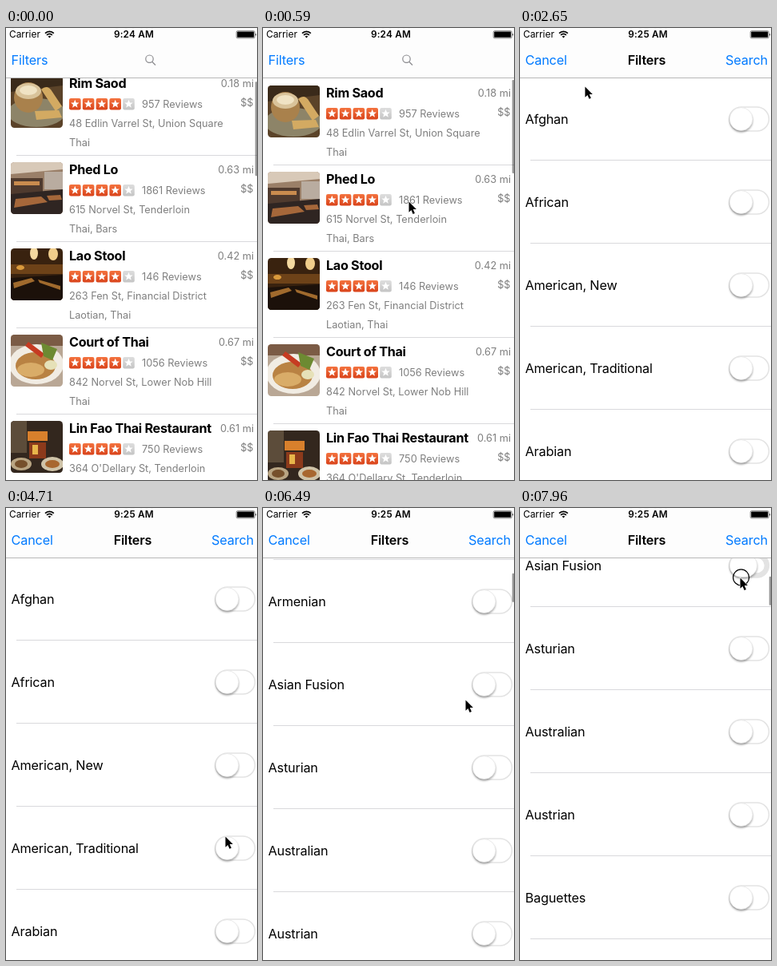
Recreate the animation shown at these times as an HTML page. Size 314x566 px, loop 8000 ms.

```html
<!DOCTYPE html>
<html lang="en">
<head>
<meta charset="utf-8">
<title>Restaurant filters</title>
<style>
  html, body { margin: 0; width: 100%; height: 100%; overflow: hidden; background: #fff; }
  svg { display: block; width: 314px; height: 566px; font: 16.2px Inter, Roboto, sans-serif; letter-spacing: -.14px; }
  .name { font-weight: 700; letter-spacing: -.3px; }
  .info { font-size: 12.75px; letter-spacing: 0; fill: #7f7f7f; }
  .title { font-weight: 600; text-anchor: middle; }
  .link { fill: #007aff; }
  .end { text-anchor: end; }
  .line { stroke: #d9d9dc; }
  .bar { fill: #000; opacity: .4; }
  .knob { fill: #fff; stroke: #ddd; stroke-width: .6; filter: drop-shadow(0 2px 1.3px rgba(0,0,0,.32)); }
  .track { fill: #fff; stroke: #e3e3e3; stroke-width: 1.5; }
  .on .track { x: 264.3px; y: 39.5px; width: 44.6px; height: 25px; rx: 12.5px; stroke-width: 6.5; }
</style>
</head>
<body>
<svg viewBox="0 0 314 566">
  <defs>
    <clipPath id="round"><rect width="65" height="65" rx="4.5"/></clipPath>
    <linearGradient id="orange" x2="0" y2="1"><stop stop-color="#f4733f"/><stop offset="1" stop-color="#d9431a"/></linearGradient>
    <linearGradient id="gray" x2="0" y2="1"><stop stop-color="#dedede"/><stop offset="1" stop-color="#c4c4c4"/></linearGradient>
    <path id="star" fill="#fff" d="M0-5.4 1.5-1.8 5.2-1.6 2.3.8 3.3 4.5 0 2.4-3.3 4.5-2.3.8-5.2-1.6-1.5-1.8Z"/>
  </defs>

  <g id="places"></g>
  <rect id="placesBar" class="bar" x="311.7" width="2.6" rx="1.2"/>
  <rect width="314" height="62" fill="#fdfdfd"/>
  <path d="M0 62.5H314" stroke="#b8b8b8"/>
  <text id="open" class="link" x="6.5" y="46">Filters</text>
  <path d="M183 42.5 187 46.5M184.2 38.7a4.7 4.7 0 1 1-9.4 0a4.7 4.7 0 1 1 9.4 0" fill="none" stroke="#8a8a8e" stroke-width="1.2"/>

  <g id="modal">
    <rect width="314" height="566" fill="#fff"/>
    <g id="filters"></g>
    <rect id="filtersBar" class="bar" x="311.7" width="2.6" height="36" rx="1.2"/>
    <rect width="314" height="62" fill="#fdfdfd"/>
    <path d="M0 62.5H314" stroke="#b8b8b8"/>
    <text class="link" x="6.5" y="46">Cancel</text>
    <text class="title" x="158.5" y="46">Filters</text>
    <text class="link end" x="310" y="46">Search</text>
  </g>

  <g style="letter-spacing:0">
    <text x="4" y="12.3" font-size="11.9">Carrier</text>
    <g fill="none" stroke="#000" stroke-width="1.7">
      <path d="M49 6.6a7.6 7.6 0 0 1 10.8 0M51 8.8a4.8 4.8 0 0 1 6.8 0"/>
      <path d="M54.4 12.4 52.6 10.5a2.6 2.6 0 0 1 3.6 0Z" fill="#000" stroke="none"/>
    </g>
    <text id="clock" class="title" x="160" y="12.4" font-size="11.8" style="letter-spacing:.2px"></text>
    <rect x="288.2" y="3.6" width="23" height="9.2" rx="1.6" fill="#fff" stroke="#666" stroke-width=".8"/>
    <rect x="289.2" y="4.6" width="21" height="7.2" rx=".6"/>
    <path d="M312.1 6.5q1.8 1.7 0 3.4Z"/>
  </g>

  <g id="cursor">
    <circle id="press" cx="1.6" cy="-.1" r="10" fill="none" stroke="#000" stroke-width="1.2"/>
    <path d="M.5.6V13.8L3.5 11 5.6 15.9 7.9 14.9 5.8 10.1H9.9Z" stroke="#fff" stroke-width="1.2" paint-order="stroke"/>
  </g>
</svg>
<script>
const $ = id => document.getElementById(id);
const shape = (fill, d) => `<path fill="${fill}" d="${d}"/>`;
const disc = (fill, x, y, rx, ry = rx) => `<ellipse fill="${fill}" cx="${x}" cy="${y}" rx="${rx}" ry="${ry}"/>`;
const ground = fill => shape(fill, 'M0 0H65V65H0Z');

const photos = [
  ground('#5b4329') + shape('#3a2a1a', 'M0 0H65V12L0 20Z') + disc('#8d8468', 32, 46, 36, 18) +
    disc('#a9814c', 22, 27, 18, 19) + disc('#d9c39a', 22, 19, 16, 10) + disc('#f0e3c4', 22, 18, 11, 6) +
    shape('#d3aa62', 'M38 17Q46 10 52 20L64 38 56 44ZM30 44 60 43 64 52 32 55Z'),
  ground('#9a7f68') + shape('#d8c9b8', 'M0 0H65V9L0 15Z') + shape('#4f3a2e', 'M0 20H40V40H0Z') +
    shape('#c98b4e', 'M4 24H36V29H4Z') + shape('#b9aca0', 'M42 12H65V34H42Z') +
    shape('#2f2522', 'M0 40 65 34V65H0Z') + shape('#a5673a', 'M6 46 38 43 46 50 4 57ZM45 42 62 41 64 47 48 48Z'),
  ground('#39220f') + shape('#6d4218', 'M0 20H65V32H0Z') + disc('#f4d9a0', 29, 6, 5, 8) + disc('#f0cd8b', 53, 7, 6, 8) +
    disc('#d99a3c', 12, 24, 5, 3) + shape('#1c110a', 'M0 37 65 33V65H0Z') +
    shape('#a06a2d', 'M3 43 26 37 30 41 4 50ZM34 39 62 47V52L36 43Z'),
  ground('#b9a795') + shape('#7b5b45', 'M0 0H65V14H0Z') + disc('#f1ece3', 32, 37, 34, 25) +
    disc('#b98243', 31, 39, 25, 17) + disc('#d9ac68', 25, 44, 17, 9) + shape('#c63b22', 'M22 9 42 24 38 29 18 14Z') +
    shape('#6d8a32', 'M38 10 58 18 52 32 41 27Z') + disc('#e6e1b8', 50, 38, 8, 6),
  ground('#33271e') + shape('#5c4c3a', 'M0 0H20V40H0Z') + shape('#d8802c', 'M21 13H46V25H21Z') +
    shape('#8c3a1b', 'M23 27H44V47H23Z') + shape('#e8b54a', 'M27 30H34V42H27Z') + disc('#cfc3a8', 52, 54, 14, 9) +
    disc('#a8672f', 52, 54, 9, 5) + disc('#b9a583', 13, 54, 13, 8) + disc('#76502b', 13, 54, 8, 5)
];
const places = [
  ['Rim Saod', 957, '0.18', '48 Edlin Varrel St, Union Square', 'Thai'],
  ['Phed Lo', 1861, '0.63', '615 Norvel St, Tenderloin', 'Thai, Bars'],
  ['Lao Stool', 146, '0.42', '263 Fen St, Financial District', 'Laotian, Thai'],
  ['Court of Thai', 1056, '0.67', '842 Norvel St, Lower Nob Hill', 'Thai'],
  ['Lin Fao Thai Restaurant', 750, '0.61', "364 O'Dellary St, Tenderloin", 'Thai']
];
const stars = [0, 1, 2, 3, 4].map(i => `<g transform="translate(${86.3 + i * 16.8} 43.2)">
  <rect x="-7.3" y="-7.3" width="14.6" height="14.6" rx="2.2" fill="url(#${i < 4 ? 'orange' : 'gray'})"/><use href="#star"/></g>`).join('');
$('places').innerHTML = places.map(([name, reviews, miles, address, kinds], i) => `<g transform="translate(0 ${i * 108})">
  <g transform="translate(6 8)" clip-path="url(#round)">${photos[i]}</g>
  <text class="name" x="79" y="23">${name}</text>${stars}
  <g class="info"><text x="170" y="48">${reviews} Reviews</text><text x="79" y="72">${address}</text>
  <text x="79" y="96">${kinds}</text><text class="end" x="310" y="22.4">${miles} mi</text>
  <text class="end" x="309.5" y="46.4">$$</text></g>
  <path class="line" d="M13 107.5H314"/></g>`).join('');

const kinds = ['Afghan', 'African', 'American, New', 'American, Traditional', 'Arabian', 'Argentine',
  'Armenian', 'Asian Fusion', 'Asturian', 'Australian', 'Austrian', 'Baguettes'];
$('filters').innerHTML = kinds.map((kind, i) => `<g transform="translate(0 ${i * 104})">
  <text x="6.5" y="57.6">${kind}</text>
  <rect class="track" x="261.8" y="37" width="49.6" height="30" rx="15"/>
  <rect class="knob" x="262.2" y="37.6" width="28.8" height="28.8" rx="14.4"/>
  <path class="line" d="M13 103.5H314"/></g>`).join('');
const rows = [...$('filters').children];

const part = (t, a, b) => Math.min(1, Math.max(0, (t - a) / (b - a)));
const easeOut = u => 1 - (1 - u) ** 3;
const smooth = u => u * u * (3 - 2 * u);

// Linear path through [time, ...values] points
function along(points, t) {
  let i = 1;
  while (i < points.length - 1 && t > points[i][0]) i++;
  const [a, b] = [points[i - 1], points[i]], u = part(t, a[0], b[0]);
  return a.slice(1).map((v, k) => v + (b[k + 1] - v) * u);
}
const bounce = [[0, 10], [150, -1], [300, -6], [450, -4], [590, -2], [880, 0]];
const path = [[0, 182, 217], [590, 182, 217], [880, 178, 130], [1170, 163, 45], [1460, 62, 41], [1610, 31, 40],
  [2210, 31, 40], [2650, 80, 72], [3090, 207, 195], [3530, 300, 286], [3830, 300, 286], [4300, 290, 350],
  [4717, 274, 411], [4860, 276, 420], [5460, 255, 240], [5610, 253, 240], [6490, 253, 240], [7080, 277, 236], [7960, 275, 87]];

function draw(t) {
  const top = along(bounce, t)[0];
  $('places').setAttribute('transform', `translate(0 ${62 - top})`);
  $('placesBar').setAttribute('y', 65 + Math.max(0, top) * .23);
  $('placesBar').setAttribute('height', 118 + Math.min(0, top) * .5);
  $('placesBar').style.opacity = .4 * (1 - part(t, 880, 1170));
  $('open').style.opacity = t < 2050 ? 1 : .2;
  $('clock').textContent = t < 1310 ? '9:24 AM' : '9:25 AM';

  $('modal').setAttribute('transform', `translate(0 ${566 * (1 - easeOut(part(t, 2100, 2650)))})`);
  const scroll = 180 * part(t, 4860, 5460) ** 2 + 441 * easeOut(part(t, 5460, 6480)) + 149 * smooth(part(t, 7080, 7960));
  $('filters').setAttribute('transform', `translate(0 ${62 - scroll})`);
  $('filtersBar').setAttribute('y', 65 + scroll / 36.9);
  $('filtersBar').style.opacity = .4 * (part(t, 4860, 5000) - part(t, 6750, 7000) + part(t, 7080, 7220));

  const held = t >= 4850 && t < 5460 ? 3 : t >= 7070 ? 7 : -1;
  rows.forEach((row, i) => {
    row.classList.toggle('on', i === held);
    row.querySelector('.knob').setAttribute('width', i === held ? 34.5 : 28.8);
  });

  let [x, y] = along(path, t);
  if (held === 3) y = 420 - scroll;
  if (held === 7) y = 857 - scroll;
  $('cursor').setAttribute('transform', `translate(${x} ${y})`);
  $('cursor').style.display = t < 250 ? 'none' : '';
  $('press').style.display = held >= 0 || (t >= 2050 && t < 2200) ? '' : 'none';
}

function tick() {
  draw(Math.floor(performance.now() % 8000 / 147.1) * 147.4);
  requestAnimationFrame(tick);
}
tick();
</script>
</body>
</html>
```
